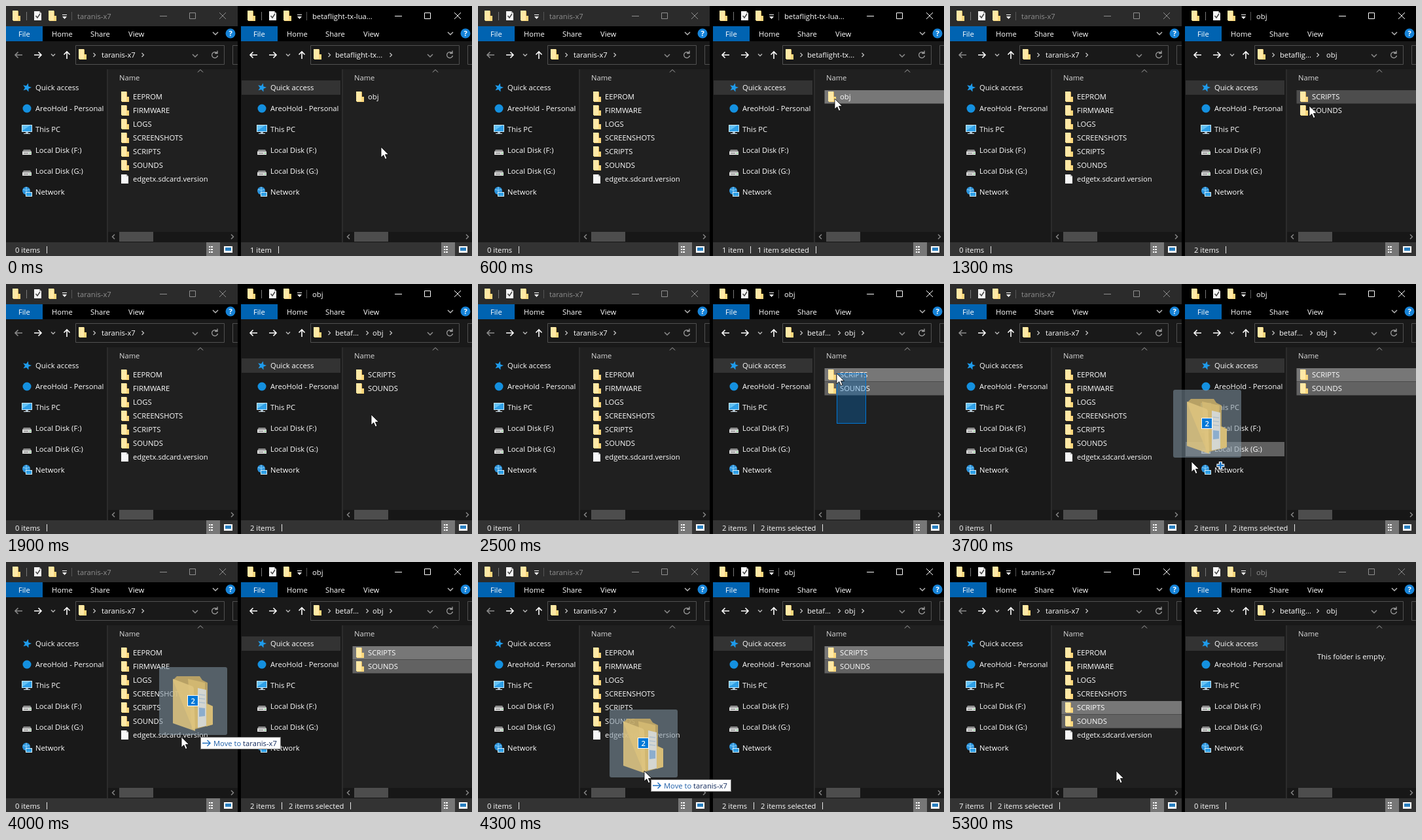
An HTML page with a canvas that plays this animation: 712x383 px, repeating every 5600 ms.

```html
<!DOCTYPE html>
<html lang="en">
<head>
<meta charset="utf-8">
<title>Moving folders between two windows</title>
<style>
html, body { margin: 0; width: 100%; height: 100%; overflow: hidden; background: #000; }
canvas { display: block; }
</style>
</head>
<body>
<canvas id="stage" width="712" height="383"></canvas>
<script>
const LOOP = 5600, STEP = 100, ROW = 21, LAG = 60;
const ctx = document.getElementById('stage').getContext('2d');
const WHITE = '#fff', GREY = '#8f8f8f', BLUE = '#0078d7';

// Pointer path: time, x, y
const POINTER = [
  [0, 573, 216], [100, 571, 208], [300, 551, 162], [500, 545, 142], [1200, 545, 142],
  [1300, 549, 153], [1400, 552, 166], [1600, 558, 207], [1700, 558, 200], [1900, 558, 200],
  [2000, 592, 213], [2400, 552, 143], [2500, 548, 137], [2600, 548, 137], [3000, 548, 158],
  [3240, 548, 160], [3300, 538, 165], [3700, 369, 272], [3800, 335, 255], [3900, 300, 246],
  [4000, 268, 268], [4100, 248, 302], [4200, 254, 320], [LOOP, 254, 320]
];

function pointerAt(t) {
  const i = Math.max(1, POINTER.findIndex(p => p[0] >= t));
  const [t0, x0, y0] = POINTER[i - 1], [t1, x1, y1] = POINTER[i];
  const k = (t - t0) / (t1 - t0);
  return [x0 + (x1 - x0) * k, y0 + (y1 - y0) * k];
}

function rect(x, y, w, h, color) {
  ctx.fillStyle = color;
  ctx.fillRect(x, y, w, h);
}

function fill(d, color) {
  ctx.fillStyle = color;
  ctx.fill(new Path2D(d));
}

function stroke(d, color, width = 1) {
  ctx.strokeStyle = color;
  ctx.lineWidth = width;
  ctx.stroke(new Path2D(d));
}

function disc(x, y, r, color) {
  ctx.fillStyle = color;
  ctx.beginPath();
  ctx.arc(x, y, r, 0, 7);
  ctx.fill();
}

function setFont(weight = 500) {
  ctx.font = `${weight} 11.2px "Open Sans", "Noto Sans", sans-serif`;
  ctx.letterSpacing = '0.01px'; // any spacing turns ligatures off
}

function textWidth(s) {
  setFont();
  return ctx.measureText(s).width;
}

function text(s, x, y, color = WHITE, weight) {
  setFont(weight);
  ctx.fillStyle = color;
  ctx.fillText(s, x, y);
  return x + ctx.measureText(s).width;
}

function at(x, y, draw) {
  ctx.save();
  ctx.translate(x, y);
  draw();
  ctx.restore();
}

const chevronRight = (x, y) => stroke(`M${x - 1.5} ${y - 3}l3 3l-3 3`, '#c8c8c8', 1.2);
const chevronDown = (x, y, size, color = '#b5b5b5', width = 1.5) =>
  stroke(`M${x - size} ${y - size / 2}l${size} ${size}l${size} ${-size}`, color, width);

function folder(x, y) {
  at(x, y, () => {
    fill('M-6-8H2V7H-6Z', '#ffe9a6');
    fill('M2-8L3-7V0H2Z', '#e5b95b');
    fill('M2 0H6V8H-5V7H2Z', '#fbd77c');
  });
}

function file(x, y) {
  at(x, y, () => {
    fill('M-6-7H2L5-4V7H-6Z', '#f7f7f7');
    fill('M2-7V-4H5Z', '#a9a9a9');
  });
}

function star() {
  let d = '';
  for (let i = 0; i < 10; i++) {
    const r = i % 2 ? 3 : 7, a = i * Math.PI / 5 - 1.3;
    d += `${i ? 'L' : 'M'}${r * Math.cos(a)} ${r * Math.sin(a)}`;
  }
  fill(d + 'Z', '#1f9bea');
}

function monitor() {
  rect(-8, -7, 16, 11, '#c9e9fb');
  rect(-7, -6, 14, 9, '#2f9fe6');
  fill('M-7-6H5L-7 2Z', '#66c3f5');
  rect(-2, 4, 4, 2, '#9fb6c4');
  rect(-5, 6, 10, 1, '#d8e4ec');
}

function disk() {
  fill('M-5-1H5L7 2H-7Z', '#8c8c8c');
  rect(-7, 2, 14, 5, '#dadada');
  rect(-5, 4, 7, 1, '#777');
  rect(4, 4, 2, 1, '#46d05a');
}

function network() {
  disc(-1, -2, 6, '#2d94dc');
  stroke('M-6-4Q-1-1 4-4M-1-8V4', '#8fd3fa');
  rect(-2, 0, 10, 7, '#d5edfa');
  rect(-1, 1, 8, 5, '#2f9fe6');
}

const PLACES = [
  ['Quick access', star],
  ['AreoHold - Personal', () => disc(0, 0, 6.5, '#1490df')],
  ['This PC', monitor],
  ['Local Disk (F:)', disk],
  ['Local Disk (G:)', disk],
  ['Network', network]
];

function titleBar(win) {
  const color = win.active ? WHITE : GREY;
  rect(0, 0, 354, 31, win.active ? '#000' : '#2b2b2b');
  folder(16, 15);
  rect(31, 9, 1, 13, '#777');
  file(49, 15);
  stroke('M45.5 15l2.5 3l4-6', '#444', 1.5);
  folder(71, 15);
  rect(86, 13, 7, 1, WHITE);
  fill('M86 16h7l-3.5 4Z', WHITE);
  rect(100, 9, 1, 13, '#555');
  text(win.title, 109, 20, color);
  stroke('M235 15.5h11M280.5 10.5h9v9h-9ZM326 10l10 10M336 10l-10 10', color);
}

function ribbon() {
  rect(0, 31, 354, 23, '#000');
  rect(0, 31, 56, 23, '#0063b1');
  [['File', 19], ['Home', 70], ['Share', 129], ['View', 187]].forEach(([s, x]) => text(s, x, 47));
  chevronDown(320, 42, 4);
  disc(343, 42, 7.5, '#1683d8');
  text('?', 340.6, 46, '#fff', 700);
}

function addressBar(win) {
  rect(0, 54, 354, 43, '#191919');
  stroke('M25 75H14M18.5 70.5L14 75l4.5 4.5', win.canGoBack ? WHITE : '#8a8a8a', 1.6);
  stroke('M43 75h11M49.5 70.5L54 75l-4.5 4.5', WHITE, 1.6);
  chevronDown(72, 75, 3);
  stroke('M93 81V70M88.5 74.5L93 70l4.5 4.5', WHITE, 1.6);
  stroke('M106.5 60.5H333.5V89.5H106.5ZM360 60.5H346.5V89.5H360', '#505050');
  folder(117, 74);
  chevronRight(135, 75);
  win.path.forEach(([s, x, chevron]) => {
    text(s, x, 79);
    if (chevron) chevronRight(chevron, 75);
  });
  chevronDown(289, 76, 4, '#8c8c8c');
  stroke('M323.5 76A4.5 4.5 0 1 1 322.2 71.8M323 68.5v4h-4', '#a0a0a0', 1.3);
}

function sidebar(win) {
  rect(0, 97, 155, 265, '#191919');
  rect(154, 97, 2, 265, '#2c2c2c');
  PLACES.forEach(([label, icon], i) => {
    const y = 125 + 32 * i;
    if (i === win.dropPlace) rect(1, y - 11, 151, 22, '#606060');
    else if (i === win.place) rect(1, y - 11, 151, 22, '#333');
    at(32, y, icon);
    text(label, 45, y + 4);
  });
}

function fileList(win) {
  rect(156, 97, 198, 249, '#202020');
  stroke('M293 101.5l4-4l4 4', '#aaa');
  text('Name', 173, 114, '#d8d8d8');
  if (!win.items.length && win.emptyNote) text('This folder is empty.', 202, 149);
  win.items.forEach((name, i) => {
    const y = 139 + ROW * i, shade = win.shades[name];
    if (shade) rect(170.5, y - 10, 184, ROW - 0.5, shade);
    (name.includes('.') ? file : folder)(182, y);
    text(name, 194, y + 4);
  });
  rect(156, 346, 198, 16, '#171717');
  rect(173, 346, 52, 15, '#4d4d4d');
  stroke('M166 350l-3.5 3.5l3.5 3.5M344 350l3.5 3.5l-3.5 3.5', '#8c8c8c', 1.4);
}

function statusBar(win) {
  rect(0, 362, 354, 21, '#333');
  let x = 14;
  win.status.forEach(s => {
    x = Math.round(text(s, x, 378)) + 10;
    rect(x, 368, 1, 11, '#e8e8e8');
    x += 11;
  });
  rect(306, 362, 21, 21, '#777');
  for (let y = 368; y < 379; y += 4) {
    rect(310, y, 2, 2, WHITE);
    rect(313, y, 3, 2, WHITE);
  }
  rect(333, 368, 13, 10, WHITE);
  rect(335, 370, 9, 5, '#2a7fc0');
}

function explorer(x, win) {
  at(x, 0, () => {
    ctx.beginPath();
    ctx.rect(0, 0, 354, 383);
    ctx.clip();
    [titleBar, ribbon, addressBar, sidebar, fileList, statusBar].forEach(part => part(win));
  });
}

const count = (n, suffix = '') => `${n} item${n === 1 ? '' : 's'}${suffix}`;
const BOTH_SELECTED = { SCRIPTS: '#777', SOUNDS: '#626262' };

function leftWindow(t) {
  return {
    active: t >= 4400,
    title: 'taranis-x7',
    path: [['taranis-x7', 146, 209]],
    items: ['EEPROM', 'FIRMWARE', 'LOGS', 'SCREENSHOTS', 'SCRIPTS', 'SOUNDS', 'edgetx.sdcard.version'],
    shades: t >= 4800 ? BOTH_SELECTED : {},
    status: t >= 5000 ? [count(7), count(2, ' selected')] : [count(0)]
  };
}

function rightShades(t) {
  if (t < 400) return {};
  if (t < 900) return { obj: t < 600 ? '#4d4d4d' : '#777' };
  if (t < 1400) return { SCRIPTS: '#4d4d4d' };
  if (t < 1500) return { SOUNDS: '#4d4d4d' };
  if (t < 2300) return {};
  return t < 2400 ? { SOUNDS: '#626262' } : BOTH_SELECTED;
}

function rightStatus(t) {
  if (t < 600) return [count(1)];
  if (t < 1000) return [count(1), count(1, ' selected')];
  if (t < 2400) return [count(2)];
  if (t < 5000) return [count(2), count(t < 2500 ? 1 : 2, ' selected')];
  return [count(0)];
}

function rightPath(t) {
  if (t < 900) return [['betaflight-tx...', 144, 229]];
  if (t >= 1500 && t < 5000) return [['betaf...', 144, 193], ['obj', 201, 229]];
  return [['betaflig...', 145, 203], ['obj', 216]];
}

function rightWindow(t, dropPlace) {
  return {
    active: t < 4400,
    canGoBack: true,
    title: t < 900 ? 'betaflight-tx-lua...' : 'obj',
    path: rightPath(t),
    place: 0,
    dropPlace,
    items: t < 900 ? ['obj'] : t < 1000 || t >= 4600 ? [] : ['SCRIPTS', 'SOUNDS'],
    emptyNote: t >= 4600,
    shades: rightShades(t),
    status: rightStatus(t)
  };
}

function marquee(x, y) {
  const w = 592 - x, h = 213 - y;
  rect(x, y, w, h, 'rgba(0,120,215,.3)');
  ctx.strokeStyle = BLUE;
  ctx.lineWidth = 1;
  ctx.strokeRect(Math.round(x) + 0.5, Math.round(y) + 0.5, w, h);
}

function dragImage() {
  ctx.fillStyle = 'rgba(130,150,165,.55)';
  ctx.beginPath();
  ctx.roundRect(0, 0, 104, 104, 3);
  ctx.fill();
  ctx.globalAlpha = 0.85;
  fill('M21 20L27 14H62L66 20L74 24V56L82 60V88L52 96Z', '#c9ad66');
  fill('M44 18L70 24V90L50 95Z', '#d6bb74');
  fill('M59 32L72 35V90L59 93Z', '#d5dce2');
  stroke('M61 42l9 1M61 48l9 1M61 54l9 1', '#a9bccb', 1.5);
  fill('M61 62l9 1v12l-9 1Z', '#7fa6cc');
  fill('M72 56L82 60V88L72 91Z', '#dcc27a');
  fill('M21 18L50 29Q53 30 53 34L55 98L21 86Z', '#e0c681');
  ctx.globalAlpha = 1;
  rect(43, 43, 17, 17, '#fff');
  rect(44, 44, 15, 15, BLUE);
  text('2', 48.4, 55.5, '#fff', 600);
}

const plusBadge = (x, y) => {
  stroke(`M${x - 6} ${y}h12M${x} ${y - 6}v12`, '#fff', 5);
  stroke(`M${x - 5} ${y}h10M${x} ${y - 5}v10`, '#1673c4', 2.5);
};

function dropTip(verb, place, copying) {
  const width = Math.round(20 + textWidth(verb + place) + 6);
  rect(0, 0, width, 19, '#767676');
  rect(1, 1, width - 2, 17, '#fff');
  if (copying) plusBadge(9, 9);
  else stroke('M3 9.5h12M10.5 5l4.5 4.5l-4.5 4.5', '#1f6fc0', 1.4);
  text(place, text(verb, 20, 13.5, '#1f5fa8'), 13.5, '#10285a');
}

function pointer() {
  const d = 'M0 0V16L3.8 12.5L6.4 18.6L9 17.5L6.4 11.6H11.5Z';
  fill(d, '#fff');
  stroke(d, '#000', 0.8);
}

function draw(t) {
  const [x, y] = pointerAt(t);
  const [dragX, dragY] = pointerAt(Math.max(0, t - LAG));
  const dragging = t >= 3200 && t < 4400;

  // The place in the side panel that the dragged folders are over
  let dropPlace = -1;
  if (dragging && t < 3800 && dragX < 511) {
    const i = Math.round((dragY - 125) / 32);
    if (Math.abs(dragY - 125 - 32 * i) < 11) dropPlace = i;
  }

  rect(0, 0, 712, 383, '#000');
  explorer(0, leftWindow(t));
  explorer(359, rightWindow(t, dropPlace));
  if (t >= 2100 && t < 2700) marquee(x, y);
  if (dragging) {
    at(Math.round(dragX - 53), Math.round(dragY - 94), dragImage);
    if (dropPlace > 0) plusBadge(dragX + 19, dragY + 22);
    if (t >= 3800) {
      const copying = t < 3900;
      at(Math.round(dragX + 10), Math.round(dragY + 13), () =>
        copying ? dropTip('Copy to ', 'Local Disk (G:)', true) : dropTip('Move to ', 'taranis-x7'));
    }
  }
  at(x, y, pointer);
}

function frame() {
  const t = performance.now() % LOOP;
  draw(Math.floor(t / STEP) * STEP);
  requestAnimationFrame(frame);
}
frame();
</script>
</body>
</html>
```
